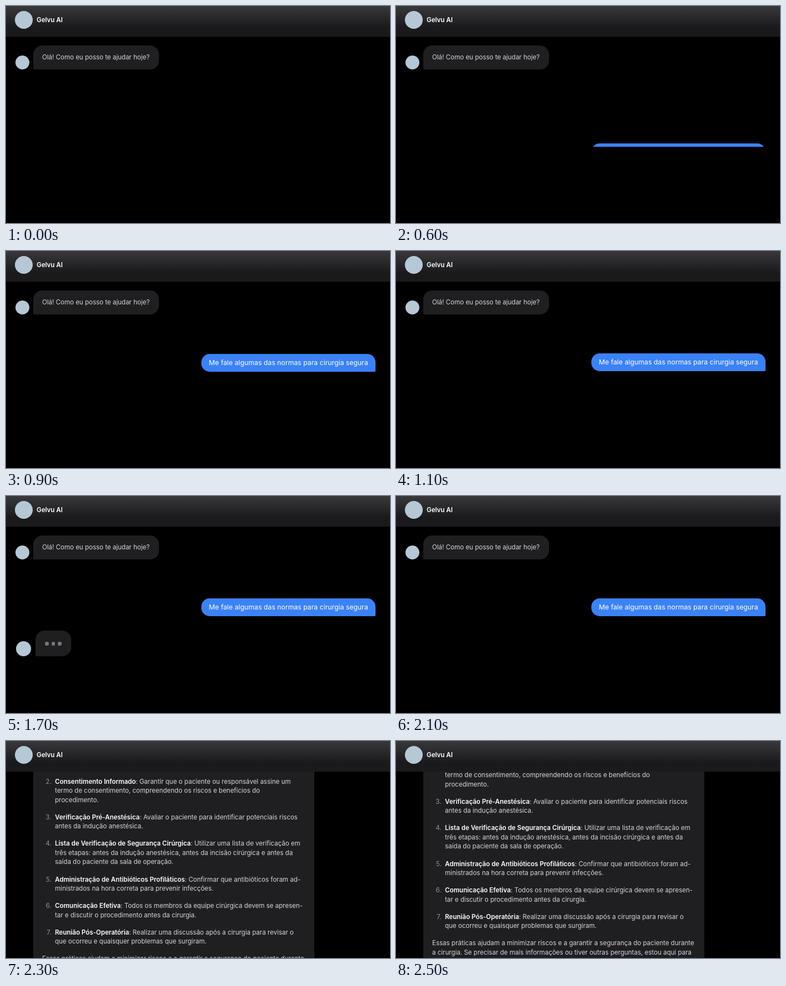
Animation, 690 px wide and 390 px high, one loop 2800 ms. Source, as an HTML page:

```html
<!DOCTYPE html>
<html lang="pt">
<head>
<meta charset="utf-8">
<style>
  html, body { margin: 0; width: 100%; height: 100%; overflow: hidden; background: #000; }
  #stage { position: relative; width: 690px; height: 390px; overflow: hidden;
    font: 11.52px/16.5px Inter, sans-serif; color: #d6d6da; }
  #stage div { position: absolute; box-sizing: border-box; white-space: nowrap; }
  #chat, #typing { left: 0; top: 0; width: 690px; height: 390px; }
  #header { left: 0; top: 0; width: 690px; height: 55px;
    background: linear-gradient(#39393b, #1a1a1c 70%); }
  #title { left: 55px; top: 16.75px; color: #fff; font-weight: 600; }
  .avatar { border-radius: 50%; background: #b6c7d5; }
  .bubble { background: #1f1f22; border-radius: 16px 16px 16px 2px; }
  #greeting { left: 49px; top: 71px; width: 226px; height: 43px; padding: 13.25px 0 0 16px; }
  #rise { left: 0; top: 55px; width: 690px; height: 198px; overflow: hidden; }
  #question { left: 351px; top: 129px; width: 313px; height: 31.5px; padding-left: 13.5px;
    border-radius: 15px 15px 2px 15px; background: #3b82f6; color: #fff;
    font-size: 12.25px; line-height: 32px; }
  #dots { left: 53px; top: 242px; width: 64px; height: 46px; }
  #dots div { top: 20px; width: 6.5px; height: 6.5px; border-radius: 50%; background: #77777b; }
  #answer { left: 49px; top: -42px; width: 505px; height: 600px; border-radius: 0; }
  #answer div { left: 16px; white-space: pre; }
  #answer .item { left: 39px; }
  #answer .item i { position: absolute; right: calc(100% + 6.5px); font-style: normal; color: #919198; }
  b { color: #fff; font-weight: 600; }
</style>
</head>
<body>
<div id="stage">
  <div id="chat">
    <div class="avatar" style="left:16.5px;top:88.5px;width:25px;height:25px"></div>
    <div id="greeting" class="bubble">Olá! Como eu posso te ajudar hoje?</div>
    <div id="rise"><div id="question">Me fale algumas das normas para cirurgia segura</div></div>
    <div id="typing">
      <div class="avatar" style="left:18px;top:260.5px;width:27px;height:27px"></div>
      <div id="dots" class="bubble"><div style="left:17.2px"></div><div style="left:28.8px"></div><div style="left:40.4px"></div></div>
    </div>
  </div>
  <div id="answer" class="bubble"></div>
  <div id="header">
    <div class="avatar" style="left:16px;top:9px;width:32px;height:32px"></div>
    <div id="title">Gelvu AI</div>
  </div>
</div>
<script>
const LOOP = 2800, STEP = 100, LINE = 16.5, GAP = 14.6;
const $ = id => document.getElementById(id);

// Each entry is a paragraph, or a list item when it has a bold heading.
const blocks = [
  ['', 'normas essenciais incluem:'],
  ['Identificação do Paciente e do Sítio Cirúrgico', 'Confirmar a identidade do paciente\ne marcar claramente o local da cirurgia.'],
  ['Consentimento Informado', 'Garantir que o paciente ou responsável assine um\ntermo de consentimento, compreendendo os riscos e benefícios do\nprocedimento.'],
  ['Verificação Pré-Anestésica', 'Avaliar o paciente para identificar potenciais riscos\nantes da indução anestésica.'],
  ['Lista de Verificação de Segurança Cirúrgica', 'Utilizar uma lista de verificação em\ntrês etapas: antes da indução anestésica, antes da incisão cirúrgica e antes da\nsaída do paciente da sala de operação.'],
  ['Administração de Antibióticos Profiláticos', 'Confirmar que antibióticos foram ad-\nministrados na hora correta para prevenir infecções.'],
  ['Comunicação Efetiva', 'Todos os membros da equipe cirúrgica devem se apresen-\ntar e discutir o procedimento antes da cirurgia.'],
  ['Reunião Pós-Operatória', 'Realizar uma discussão após a cirurgia para revisar o\nque ocorreu e quaisquer problemas que surgiram.'],
  ['', 'Essas práticas ajudam a minimizar riscos e a garantir a segurança do paciente durante\na cirurgia. Se precisar de mais informações ou tiver outras perguntas, estou aqui para'],
];

let y = 0;
$('answer').innerHTML = blocks.map(([head, text], i) => {
  const top = y;
  y += text.split('\n').length * LINE + GAP;
  return head
    ? `<div class="item" style="top:${top}px"><i>${i}.</i><b>${head}</b>: ${text}</div>`
    : `<div style="top:${top}px">${text}</div>`;
}).join('');

// Remaining share of a cubic ease-out.
const remaining = (t, start, length) =>
  (1 - Math.min(1, Math.max(0, (t - start) / length))) ** 3;
const show = (id, on) => { $(id).style.display = on ? 'block' : 'none'; };

function draw(now) {
  const t = Math.floor(now % LOOP / STEP) * STEP;
  show('chat', t < 2200);
  show('rise', t >= 600);
  show('typing', t >= 1700 && t < 2000);
  show('answer', t >= 2200);
  $('question').style.transform = `translateY(${63 * remaining(t, 600, 400)}px)`;
  $('answer').style.transform = `translateY(${93 * remaining(t, 2200, 300)}px)`;
  requestAnimationFrame(draw);
}
draw(performance.now());
</script>
</body>
</html>
```
